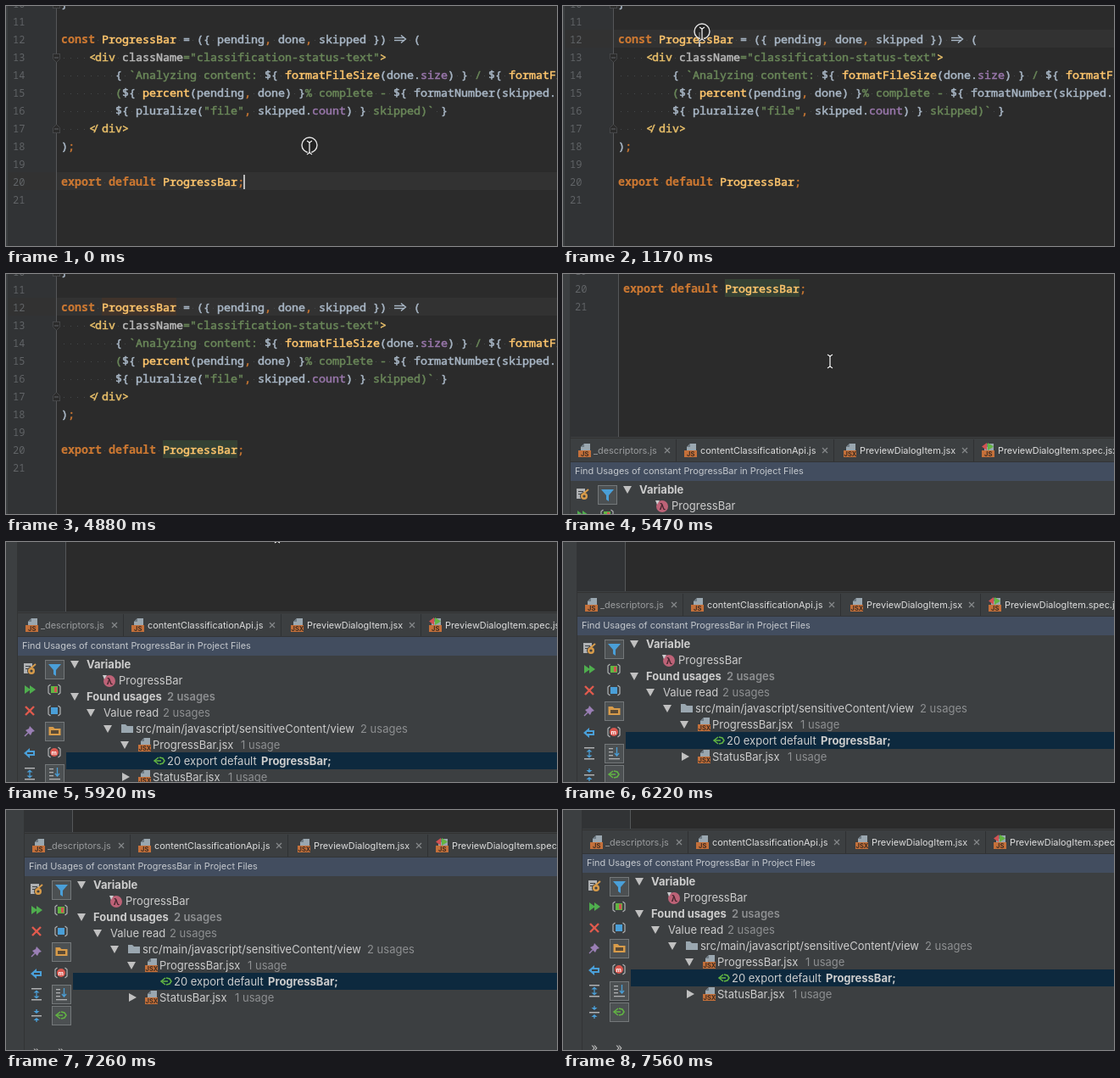
An HTML page with a canvas that plays this animation: 650 px wide and 283 px high, repeating every 8000 ms.

```html
<!DOCTYPE html>
<html lang="en">
<head>
<meta charset="utf-8">
<title>Find usages</title>
<style>
  html, body { margin: 0; width: 650px; height: 283px; overflow: hidden; background: #2b2b2b; }
  canvas { display: block; }
</style>
</head>
<body>
<canvas id="stage" width="650" height="283"></canvas>
<script>
const g = document.getElementById('stage').getContext('2d');
const LOOP = 8000, STEP = 148, CHAR = 8, LEFT = 65;
const MONO = '"Noto Sans Mono", "DejaVu Sans Mono", monospace';
const SANS = 'Inter, Roboto, sans-serif';
const PANEL = '#3c3f41';
const COLORS = { k: '#cc7832', o: '#cc7832', f: '#ffc66d', p: '#a9b7c6', s: '#6a8759', a: '#bababa', t: '#e8bf6a', u: '#9876aa' };

// Line number -> alternating colour key and text; "⇒~" is one wide arrow
const CODE = {
  10: 'p|}',
  12: 'k|const |f|ProgressBar|p| = ({ pending|o|,|p| done|o|,|p| skipped }) ⇒~ (',
  13: 't|    <div |a|className|s|="classification-status-text"|t|>',
  14: 'p|        { |s|`Analyzing content: |p|${ |f|formatFileSize|p|(done.|u|size|p|) }|s| / |p|${ |f|formatFile',
  15: 's|        (|p|${ |f|percent|p|(pending|o|,|p| done) }|s|% complete - |p|${ formatNumber(skipped.',
  16: 'p|        ${ pluralize(|s|"file"|o|,|p| skipped.|u|count|p|) }|s| skipped)`|p| }',
  17: 't|    </div>',
  18: 'p|)|o|;',
  20: 'k|export default |f|ProgressBar|o|;'
};

// Step, x, y
const POINTER = [[0, 358, 164], [8, 164, 30], [12, 184, 48], [27, 184, 48], [33, 309, 293], [54, 309, 293]];
const CAMERA = [[0, 0, 0], [33, 0, 0], [35, 2, -70], [37, 6, -190], [40, 11, -300], [43, 16, -336],
  [45, 19, -348], [47, 19, -354], [48, 19, -354], [51, 20, -360], [54, 20, -360]];

const linear = u => u;
const smooth = u => u * u * (3 - 2 * u);

function track(keys, n, ease) {
  const i = Math.max(1, keys.findIndex(k => k[0] >= n));
  const [a, b] = [keys[i - 1], keys[i]];
  const u = ease((n - a[0]) / (b[0] - a[0]));
  return [1, 2].map(j => Math.round(a[j] + (b[j] - a[j]) * u));
}

function rect(x, y, w, h, color) {
  g.fillStyle = color;
  g.fillRect(x, y, w, h);
}

function text(str, x, y, color, font) {
  g.font = font;
  g.fillStyle = color;
  g.fillText(str, x, y);
}

// Text thickened by a thin outline
function heavyText(str, x, y, color, font, outline) {
  text(str, x, y, color, font);
  g.strokeStyle = color;
  g.lineWidth = outline;
  g.strokeText(str, x, y);
}

function line(color, width, ...pts) {
  g.strokeStyle = color;
  g.lineWidth = width;
  g.beginPath();
  for (let i = 0; i < pts.length; i += 2) g.lineTo(pts[i], pts[i + 1]);
  g.stroke();
}

function poly(color, ...pts) {
  g.fillStyle = color;
  g.beginPath();
  for (let i = 0; i < pts.length; i += 2) g.lineTo(pts[i], pts[i + 1]);
  g.fill();
}

function disc(x, y, r, color) {
  g.fillStyle = color;
  g.beginPath();
  g.arc(x, y, r, 0, 7);
  g.fill();
}

const rowY = n => 39 + 21 * (n - 12);

function drawArrow(x, y) {
  line('#a9b7c6', 1.4, x + 1, y - 6, x + 13, y - 6);
  line('#a9b7c6', 1.4, x + 1, y - 3, x + 13, y - 3);
  line('#a9b7c6', 1.4, x + 9, y - 9, x + 14.5, y - 4.5, x + 9, y);
}

function drawCode(n) {
  const parts = CODE[n].split('|'), y = rowY(n) + 4.5;
  let col = 0, prev = '';
  for (let i = 0; i < parts.length; i += 2) {
    const color = COLORS[parts[i]], bold = parts[i] === 'k';
    const font = (bold ? 700 : 500) + ' 13.35px ' + MONO;
    for (const ch of parts[i + 1]) {
      const x = LEFT + CHAR * col++;
      const kern = ch === '<' ? 1 : prev === '<' && ch === '/' ? -3 : 0;
      if (ch === ' ') rect(x + 3, y - 3.5, 1, 1, '#45484a');
      else if (ch === '⇒') drawArrow(x, y);
      else if (ch !== '~') heavyText(ch, x + kern, y, color, font, bold ? 0.15 : 0.5);
      prev = ch;
    }
  }
}

// Folding mark: pentagon pointing down (1) or up (-1)
function fold(y, d) {
  g.fillStyle = '#2b2b2b';
  line('#606366', 1, 55.5, y - 5 * d, 63.5, y - 5 * d, 63.5, y + d, 59.5, y + 5 * d, 55.5, y + d, 55.5, y - 5 * d);
  g.fill();
  line('#606366', 1, 57, y - 0.5 * d, 62, y - 0.5 * d);
}

function drawEditor(n) {
  const clicked = n >= 8, current = clicked ? 12 : 20;
  rect(-20, -20, 700, 420, '#2b2b2b');
  rect(3, -20, 57, 420, '#313335');
  rect(3, rowY(current) - 11, 677, 21, '#323232');
  rect(59, -20, 1, 420, '#555759');
  rect(-20, -20, 23, 420, PANEL);
  rect(2, -20, 1, 420, '#323435');
  fold(rowY(10) + 0.5, -1);
  fold(rowY(13) + 1.5, 1);
  fold(rowY(17) + 0.5, -1);
  if (n >= 10) {
    rect(113, rowY(12) - 11, 88, 21, '#40332b');
    rect(185, rowY(20) - 11, 88, 21, '#344134');
  }
  for (let i = 10; i <= 21; i++) {
    text(i, 8, rowY(i) + 4.5, '#606366', '12px ' + MONO);
    if (CODE[i]) drawCode(i);
  }
  if (n < 16 || (n >= 20 && n < 23)) rect(clicked ? 160 : 280, rowY(current) - 8, 2, 17, '#bbbbbb');
}

function fileIcon(x, y, label) {
  poly('#9aa7b0', x + 7, y - 8, x + 14, y - 8, x + 14, y + 2, x + 3, y + 2, x + 3, y - 4);
  poly('#6e7b84', x + 3, y - 4, x + 7, y - 8, x + 7, y - 4);
  rect(x, y, 15, 8, '#c4703a');
  text(label, x + (label.length > 2 ? 0.5 : 3), y + 7, '#3a2a20', '700 7.5px ' + SANS);
}

function triangle(x, y, open) {
  if (open) poly('#c0c0c0', x - 5, y - 4, x + 5, y - 4, x, y + 5);
  else poly('#c0c0c0', x - 4, y - 5, x + 5, y, x - 4, y + 5);
}

function row(x, y, label, note, noteX, bold) {
  text(label, x, y + 4.5, '#cccccc', (bold ? 700 : 400) + ' 13px ' + SANS);
  if (note) text(note, noteX, y + 4.5, '#8d8f91', (bold ? 600 : 400) + ' 13px ' + SANS);
}

function folder(x, y, color) {
  poly(color, x, y - 5, x + 5, y - 5, x + 7, y - 3, x + 14, y - 3, x + 14, y + 5, x, y + 5);
}

function usageArrow(x, y) {
  line('#62b543', 1.5, x, y - 4, x - 5, y, x, y + 4);
  line('#62b543', 1.5, x - 5, y, x + 3, y);
  line('#62b543', 1.5, x + 1, y - 4, x + 5, y - 3, x + 7, y, x + 5, y + 3, x + 1, y + 4);
}

function drawTabs() {
  rect(0, 22, 680, 29, PANEL);
  rect(23, 23, 657, 1, '#323232');
  const tabs = [[32, '_descriptors.js', 137], [157, 'contentClassificationApi.js', 323],
    [345, 'PreviewDialogItem.jsx', 488], [508, 'PreviewDialogItem.spec.jsx']];
  tabs.forEach(([x, name, close], i) => {
    fileIcon(x, 38, name.endsWith('jsx') && i < 3 ? 'JSX' : 'JS');
    text(name, x + (i ? 19 : 18), 42, i ? '#dddddd' : '#9a9c9e', '10.9px ' + SANS);
    if (!close) {
      poly('#d25252', x + 6, 29, x + 6, 38, x, 33.5);
      poly('#62b543', x + 7, 29, x + 14, 33.5, x + 7, 38);
      return;
    }
    line('#85888a', 1.2, close - 3, 35, close + 3, 41);
    line('#85888a', 1.2, close - 3, 41, close + 3, 35);
    rect(close + 10, 25, 1, 26, '#2f3133');
  });
}

function boxed(y) {
  rect(55, y - 11, 23, 23, '#74787a');
  rect(56, y - 10, 21, 21, '#4c5052');
}

function brackets(y) {
  for (const d of [-1, 1])
    line('#afb1b3', 1.2, 66 + 4.5 * d, y - 6, 66 + 7 * d, y - 4, 66 + 7 * d, y + 4, 66 + 4.5 * d, y + 6);
}

function drawTools() {
  const light = '#afb1b3', blue = '#4a9fd8';
  // Left column
  rect(30, 83, 10, 12, light);
  rect(32, 86, 6, 1, PANEL);
  rect(32, 89, 4, 1, PANEL);
  disc(39, 92, 5, PANEL);
  disc(39, 92, 4, '#d79b4a');
  disc(39, 92, 1.6, PANEL);
  line('#d79b4a', 2, 38, 89, 44, 84);
  for (const x of [31, 37]) poly('#4fae4e', x, 109, x + 7, 114, x, 119);
  line('#e05a4e', 2.4, 32, 134, 42, 144);
  line('#e05a4e', 2.4, 32, 144, 42, 134);
  poly('#9a7fb5', 37, 157, 43, 163, 40, 164, 38, 168, 32, 162, 36, 160);
  line('#9a7fb5', 1.5, 35, 165, 31, 169);
  poly(blue, 30, 189, 37, 183, 37, 186, 43, 186, 43, 192, 37, 192, 37, 195);
  rect(34, 188, 7, 2, PANEL);
  for (const [y, d] of [[213, 1], [238, -1]]) {
    if (d > 0) { rect(31, y - 7, 12, 1.5, light); rect(31, y + 6, 12, 1.5, light); }
    else rect(31, y, 12, 1.5, light);
    for (const s of [-1, 1]) {
      const tip = y + 0.5 + s * (d > 0 ? 5 : 2.5), base = tip - s * d * 3;
      poly(blue, 33.5, base, 40.5, base, 37, tip);
      line(blue, 1.3, 37, base, 37, base - s * d * 2);
    }
  }
  // Right column
  [90, 163, 213, 238].forEach(boxed);
  poly(blue, 59, 84, 74, 84, 68, 91, 68, 98, 65, 96, 65, 91);
  [114, 139, 188].forEach(brackets);
  rect(62, 110, 8, 8, '#62b543');
  rect(66, 111, 3, 6, '#d25252');
  rect(62, 135, 8, 8, blue);
  folder(59.5, 163, '#d79b4a');
  rect(62, 162, 9, 4, '#5a4a35');
  disc(66, 188, 5, '#d9574f');
  text('m', 62.6, 190.5, '#ffffff', '700 7px ' + SANS);
  for (let i = 0; i < 4; i++) rect(60, 207 + 4 * i, i === 3 ? 13 : 5, 1.3, light);
  line(blue, 1.3, 69.5, 206, 69.5, 216);
  line(blue, 1.3, 67, 213, 69.5, 216, 72, 213);
  usageArrow(65, 238);
  for (const x of [33, 62]) text('»', x, 285, '#c0c0c0', '14px ' + SANS);
}

function drawTree() {
  rect(80, 188, 600, 20, '#0d293e');
  [[90, 84], [90, 122], [109, 141], [129, 160], [149, 179]].forEach(([x, y]) => triangle(x, y, true));
  triangle(150, 217, false);
  row(104, 84, 'Variable', '', 0, true);
  disc(131, 104, 7, '#bd6277');
  text('λ', 127.8, 108, '#45272f', '700 10.5px ' + SANS);
  poly('#c9ccce', 123, 97, 128, 97, 125, 102);
  row(142, 103, 'ProgressBar');
  row(104, 122, 'Found usages', '2 usages', 199, true);
  row(124, 141, 'Value read', '2 usages', 194);
  folder(145, 160, '#9aa7b0');
  row(162, 160, 'src/main/javascript/sensitiveContent/view', '2 usages', 427);
  fileIcon(165, 179, 'JSX');
  row(182, 179, 'ProgressBar.jsx', '1 usage', 286);
  usageArrow(189, 198);
  row(199, 198, '20 export default ');
  row(310, 198, 'ProgressBar;', '', 0, true);
  fileIcon(165, 217, 'JSX');
  row(182, 217, 'StatusBar.jsx', '1 usage', 271);
}

function drawPanel() {
  rect(0, 22, 680, 300, PANEL);
  drawTabs();
  rect(23, 51, 657, 23, '#424d5f');
  rect(23, 51, 657, 1, '#323436');
  text('Find Usages of constant ProgressBar in Project Files', 28, 66, '#c4c8cd', '10.9px ' + SANS);
  rect(22, 22, 1, 300, '#323435');
  drawTools();
  drawTree();
}

function drawPointer(x, y, ring) {
  if (ring) {
    disc(x, y, 9, 'rgba(30,30,30,.6)');
    g.strokeStyle = '#e4e4e4';
    g.lineWidth = 1.4;
    g.beginPath();
    g.arc(x, y, 9, 0, 7);
    g.stroke();
    y += 3;
  }
  for (const [color, w] of [['#222222', 3], ['#f0f0f0', 1.3]]) {
    line(color, w, x, y - 6, x, y + 6);
    for (const d of [-1, 1]) line(color, w, x - 3, y + 8 * d, x, y + 6 * d, x + 3, y + 8 * d);
  }
}

function draw(now) {
  const n = Math.min(53, Math.floor((now % LOOP + 20) / STEP));
  const [cx, cy] = track(CAMERA, n, linear);
  g.setTransform(1, 0, 0, 1, cx, cy);
  drawEditor(n);
  g.save();
  g.translate(-20, 360);
  drawPanel();
  g.restore();
  drawPointer(...track(POINTER, n, smooth), n < 10);
  requestAnimationFrame(draw);
}
requestAnimationFrame(draw);
</script>
</body>
</html>
```
